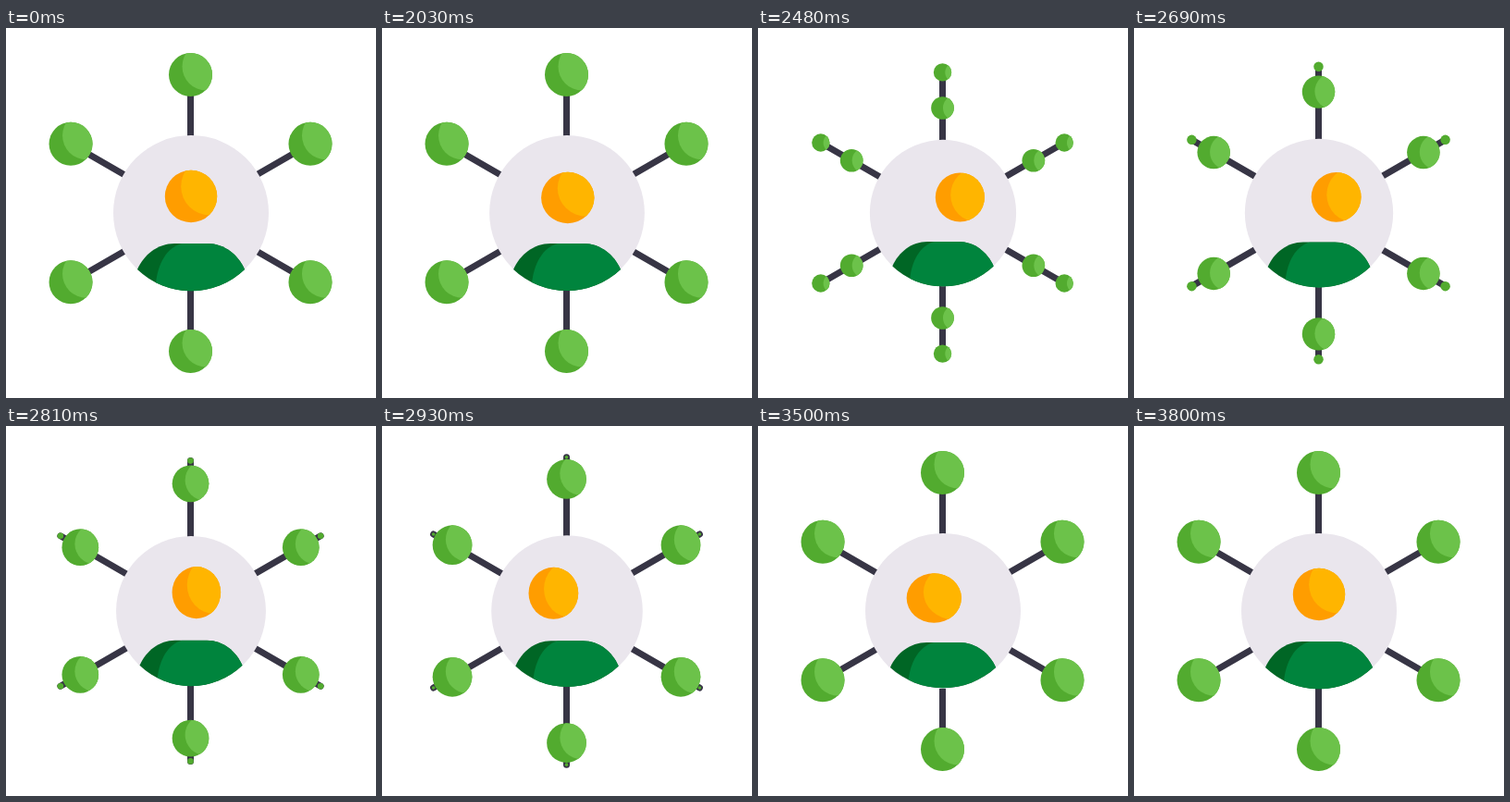
Write an HTML page with a canvas that moves like this. It is 400 px wide and 400 px high and loops after 3830 ms.

```html
<!DOCTYPE html>
<html lang="en">
<head>
<meta charset="utf-8">
<title>Network hub</title>
<style>
html, body { margin: 0; width: 100%; height: 100%; overflow: hidden; background: #fff; }
canvas { display: block; }
</style>
</head>
<body>
<canvas id="stage" width="400" height="400"></canvas>
<script>
const ctx = document.getElementById('stage').getContext('2d');
const LOOP = 3830, START = 2030;
const REACH = 149.5, NODE = 23.5;

const span = (t, a, b) => Math.min(1, Math.max(0, (t - a) / (b - a)));
const ease = (t, a, b) => { const u = span(t, a, b); return u * u * (3 - 2 * u); };
const hump = (t, a, b) => Math.sin(Math.PI * span(t, a, b));

const body = new Path2D('M-58 61C-51 45-36 33-18 33H18C36 33 51 45 58 61A84 84 0 0 1-58 61Z');
const bodyLight = new Path2D('M-10 33C-26 37-36 55-38 76V90H70V33Z');

function disc(x, y, r, color) {
  ctx.fillStyle = color;
  ctx.beginPath();
  ctx.arc(x, y, r, 0, 2 * Math.PI);
  ctx.fill();
}

// Ball with a lighter right side; shift and drop move the light part
function ball(x, y, r, dark, light, shift, drop) {
  if (r <= 0) return;
  const k = r / NODE;
  disc(x, y, r, dark);
  ctx.save();
  ctx.clip();
  disc(x + 17 * k + shift, y - 9 * k + drop, 26 * k, light);
  ctx.restore();
}

function node(angle, dist, r) {
  const k = r / NODE;
  ball(dist * Math.cos(angle), dist * Math.sin(angle), r,
    '#52ab2f', '#6cc24a', 11 * (1 - k), Math.min(9 * k, 25 * (1 - k)));
}

function spokes(t) {
  const out = 21 * ease(t, 2280, 3200);
  const oldDist = REACH + out;
  const oldSize = t < START ? NODE : NODE * (1 - span(t, START, 3260)) ** 1.95;
  const left = (0.0031 * Math.max(0, 3545 - t)) ** 3;
  const tip = oldDist - out * ease(t, 3200, 3420);

  for (let i = 0; i < 6; i++) {
    const a = Math.PI * (i / 3 + 1 / 6);
    ctx.strokeStyle = '#373545';
    ctx.lineWidth = 7;
    ctx.lineCap = 'round';
    ctx.beginPath();
    ctx.moveTo(0, 0);
    ctx.lineTo(tip * Math.cos(a), tip * Math.sin(a));
    ctx.stroke();
    node(a, oldDist, oldSize);
    node(a, REACH - left, NODE - 0.31 * left);
  }
}

function person(t) {
  const land = hump(t, 3335, 3665);
  const dip = hump(t, 1990, 2320) + land - 0.7 * hump(t, 2690, 2994);
  const lean = ease(t, 1990, 2320) - 2 * ease(t, 2690, 2994) + ease(t, 3335, 3665);
  const size = 1 - 0.061 * (ease(t, 2000, 2330) - ease(t, 2330, 3430));

  ctx.save();
  ctx.scale(size, size);
  disc(0, 0, 84, '#eae6ed');

  ctx.save();
  ctx.translate(0, 58);
  ctx.scale(1 - 0.022 * hump(t, 2690, 3800), 1 - 0.04 * land);
  ctx.translate(0, -58);
  ctx.fillStyle = '#006625';
  ctx.fill(body);
  ctx.clip(body);
  ctx.fillStyle = '#00843d';
  ctx.fill(bodyLight);
  ctx.restore();

  ctx.translate(19.5 * lean, -18 + 4 * dip);
  ctx.scale(1 + 0.05 * dip, 1 - 0.05 * dip);
  ball(0, 0, 28.2, '#ff9d00', '#ffb500', 0, 8 * Math.abs(lean));
  ctx.restore();
}

function draw(now) {
  const time = now % LOOP;
  const t = time < START ? 0 : time;
  ctx.setTransform(1, 0, 0, 1, 0, 0);
  ctx.fillStyle = '#fff';
  ctx.fillRect(0, 0, 400, 400);
  ctx.translate(199.5, 200);
  spokes(t);
  ctx.translate(0.5, 0);
  person(t);
}

let begin;
function tick(now) {
  begin ??= now;
  draw(now - begin);
  requestAnimationFrame(tick);
}
requestAnimationFrame(tick);
</script>
</body>
</html>
```
